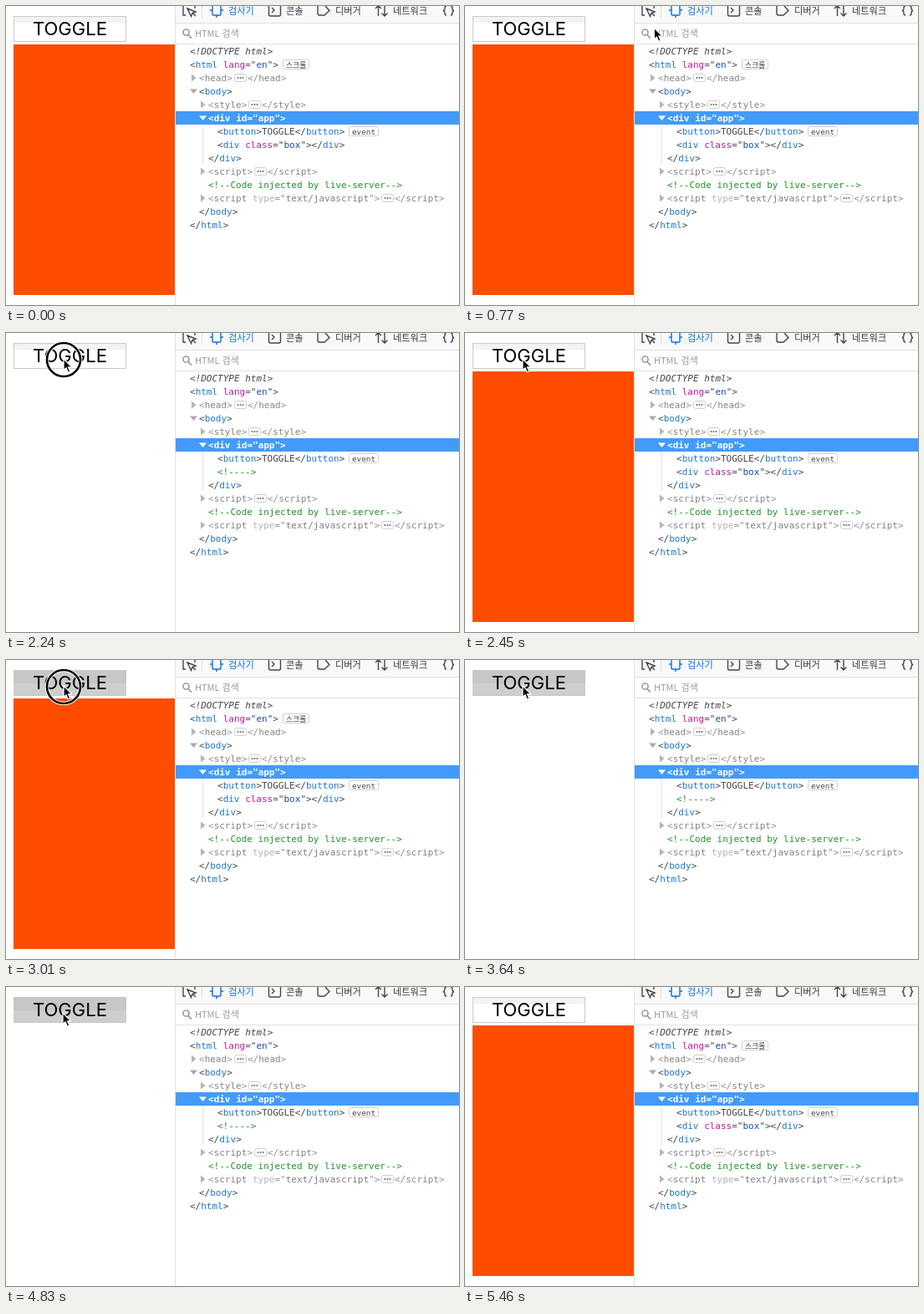
Animation, 542 px wide and 358 px high, one loop 5.74 s. Source, as an HTML page:

```html
<!DOCTYPE html>
<html lang="ko">
<head>
<meta charset="utf-8">
<title>Toggle demo</title>
<style>
  html, body { margin: 0; width: 100%; height: 100%; overflow: hidden; background: #fff; }
  svg { display: block; }
  .code { font: 11px "DejaVu Sans Mono", monospace; fill: #45454c; }
  .tag { fill: #1f78c8; }
  .attr { fill: #c4169c; }
  .val { fill: #1b4ca8; }
  .dim, .dim .tag { fill: #929292; }
  .dim .tag { fill: #858585; }
  .dim .attr { fill: #b4b4b4; }
  .dim .val { fill: #808080; }
  .sel, .sel * { fill: #fff; font-weight: bold; }
  .note { fill: #23912a; }
  .ui { font: 11.2px "Noto Sans CJK KR", "Noto Sans CJK", sans-serif; fill: #38383d; }
  .line { fill: none; stroke: #45454a; stroke-width: 1.4; }
  .pill { fill: #fff; stroke: #cfcfd2; }
</style>
</head>
<body>
<svg id="stage" width="542" height="358" viewBox="0 0 542 358">
  <rect id="box" x="9" y="46" width="194" height="300" fill="#ff4d00"/>
  <g id="idle">
    <rect x="9.5" y="12.5" width="134" height="30" fill="#fff" stroke="#c9c9c9"/>
    <rect x="10" y="13" width="133" height="7" fill="#f3f3f3"/>
  </g>
  <g id="pressed">
    <rect x="9" y="12" width="135" height="31" fill="#c7c7c7"/>
    <rect x="9" y="28" width="135" height="14" fill="#cecece"/>
  </g>
  <text x="32" y="35.3" font-family="Inter, sans-serif" font-size="22">TOGGLE</text>

  <rect x="203" width="339" height="358" fill="#fff"/>
  <rect x="203" width="339" height="20" fill="#f9f9fa"/>
  <path d="M202.5 0V358M203 20.5H542M203 45.5H542M234.5 0V14" stroke="#e1e1e3"/>
  <path d="M235.5 142V189" stroke="#e2e2e4"/>
  <g class="line">
    <path d="M215 11h-3V0M226 0v3M217 3l10 4-4 1.5-1.5 4zM223 8l4 4"/>
    <path d="M247 0v10q0 1 1 1h8q1 0 1-1V0M244 5h3M257 5h3M252 11v3" stroke="#0a6fe0"/>
    <path d="M314.5 0v10q0 2 2 2h10q2 0 2-2V0M318 2l3 3-3 3"/>
    <path d="M373 0v9q0 2 2 2h6l6-5.5L382 0"/>
    <path d="M445.5 12V0M442 3l3.500-3.500 3.500 3.500M453 0v12M449.500 8.500l3.500 3.500 3.500-3.500"/>
    <path d="M527 0q-2 0-2 2v1q0 2-2 2.500 2 .5 2 2.500v1q0 2 2 2M532 0q2 0 2 2v1q0 2 2 2.500-2 .5-2 2.500v1q0 2-2 2"/>
    <g stroke="#8a8a8f"><circle cx="215.500" cy="31.500" r="3.600"/><path d="M218 34.500l4 4"/></g>
  </g>
  <g class="ui">
    <text x="266" y="10" fill="#0a6fe0" style="fill:#0a6fe0">검사기</text>
    <text x="335" y="10">콘솔</text>
    <text x="394" y="10">디버거</text>
    <text x="463" y="10">네트워크</text>
    <text x="226" y="37" style="fill:#9a9a9e;font-size:11px">HTML 검색</text>
  </g>
  <rect x="203" y="126" width="339" height="16" fill="#429bfa"/>
  <g id="tree" class="code"></g>
  <g id="badge">
    <rect class="pill" x="331.500" y="64.500" width="31" height="11" rx="2"/>
    <text class="ui" x="335" y="73.500" style="font-size:8.800px">스크롤</text>
  </g>
  <rect class="pill" x="410.500" y="144.500" width="35" height="11" rx="2"/>
  <text class="code" x="414" y="153.500" style="font-size:9.300px">event</text>

  <g id="pointer">
    <g id="ring" fill="none">
      <circle cy="1" r="20" stroke="#fff" stroke-width="4.400"/>
      <circle cy="1" r="20" stroke="#000" stroke-width="2.600"/>
    </g>
    <path d="M0 0V13.500L3 10.700 5.300 16 7.800 15 5.500 9.800H9.700Z" stroke="#fff" stroke-width="1.200"/>
  </g>
</svg>
<script>
const $ = id => document.getElementById(id);
const span = (cls, s) => `<tspan class="${cls}">${s}</tspan>`;
const escape = s => s.replace(/</g, '&lt;').replace(/>/g, '&gt;');

const highlight = s => s.replace(/(<\/?)(\w+)(?: (\w+)="(.*?)")?>/g, (_, open, tag, attr, val) =>
  escape(open) + span('tag', tag) +
  (attr ? ' ' + span('attr', attr) + '="' + span('val', val) + '"' : '') + '&gt;');

const text = (row, x, body, cls = '') =>
  `<text class="${cls}" x="${x}" y="${58 + row * 16}">${body}</text>`;
const node = (row, x, s, cls) => text(row, x, highlight(s), cls);

const arrow = (row, x, open, fill) => {
  const y = 54 + row * 16;
  const d = open ? `M${x - 11} ${y - 2.5}h9l-4.500 5.500z` : `M${x - 9} ${y - 4.5}v9l5.500-4.500z`;
  return `<path d="${d}" fill="${fill}"/>`;
};

// A closed element: arrow, opening tag, ellipsis pill, closing tag
const folded = (row, x, open, close) => {
  const end = Math.round(x + open.length * 6.62), y = 54 + row * 16;
  const dots = [-3, 0, 3].map(d =>
    `<circle cx="${end + 9.5 + d}" cy="${y}" r="1" fill="#666"/>`).join('');
  return arrow(row, x, false, '#b5b5b8') + node(row, x, open, 'dim') +
    `<rect class="pill" x="${end + 2.5}" y="${y - 4.5}" width="14" height="9" rx="2"/>` + dots +
    node(row, end + 18, close, 'dim');
};

$('tree').innerHTML = [
  `<g font-style="italic">${text(0, 220, escape('<!DOCTYPE html>'))}</g>`,
  node(1, 220, '<html lang="en">'),
  folded(2, 231, '<head>', '</head>'),
  arrow(3, 231, true, '#aaaaad'), node(3, 231, '<body>'),
  folded(4, 242, '<style>', '</style>'),
  arrow(5, 242, true, '#fff'), node(5, 242, '<div id="app">', 'sel'),
  node(6, 253, '<button>TOGGLE</button>'),
  `<g id="shown">${node(7, 253, '<div class="box"></div>')}</g>`,
  `<g id="hidden">${text(7, 253, escape('<!---->'), 'note')}</g>`,
  node(8, 242, '</div>'),
  folded(9, 242, '<script>', '<\/script>'),
  text(10, 242, escape('<!--Code injected by live-server-->'), 'note'),
  folded(11, 242, '<script type="text/javascript">', '<\/script>'),
  node(12, 231, '</body>'),
  node(13, 220, '</html>')
].join('');

const LOOP = 5740, STEP = 70;
// Per click: ring on, button down, ring off, box toggles, scroll badge toggles
const clicks = [
  [1120, 1540, 1610, 1680, 1890],
  [2240, 2310, 2380, 2450, 2590],
  [2800, 2870, 3080, 3080, 3220],
  [3430, 3500, 3640, 3710, 3850],
  [4200, 4270, 4340, 4410, 4480],
  [4690, 4760, 4830, 4900, 5040]
];
// Pointer path: time, x, y
const path = [
  [70, 524, 2], [630, 305, 24], [1050, 69, 31], [4130, 69, 31], [4200, 68, 31],
  [5110, 68, 31], [5250, 118, 70], [5390, 364, 343]
];

function position(t) {
  const i = path.findIndex(p => p[0] >= t);
  if (i < 0) return null;
  if (i === 0) return t < path[0][0] ? null : path[0];
  const a = path[i - 1], b = path[i], k = (t - a[0]) / (b[0] - a[0]);
  return a.map((v, n) => v + (b[n] - v) * k);
}

const show = (id, on) => $(id).setAttribute('display', on ? 'inline' : 'none');

function draw(now) {
  const t = Math.floor(now % LOOP / STEP) * STEP;
  const during = (from, to) => clicks.some(c => t >= c[from] && t < c[to]);
  const even = n => clicks.filter(c => t >= c[n]).length % 2 === 0;
  const down = during(1, 3), visible = even(3), at = position(t);
  show('pressed', down);
  show('idle', !down);
  show('box', visible);
  show('shown', visible);
  show('hidden', !visible);
  show('badge', even(4));
  show('ring', during(0, 2));
  show('pointer', at && t < 5460);
  if (at) $('pointer').setAttribute('transform', `translate(${at[1]} ${at[2]})`);
}

const start = performance.now();
function tick() {
  draw(performance.now() - start);
  requestAnimationFrame(tick);
}
tick();
</script>
</body>
</html>
```
